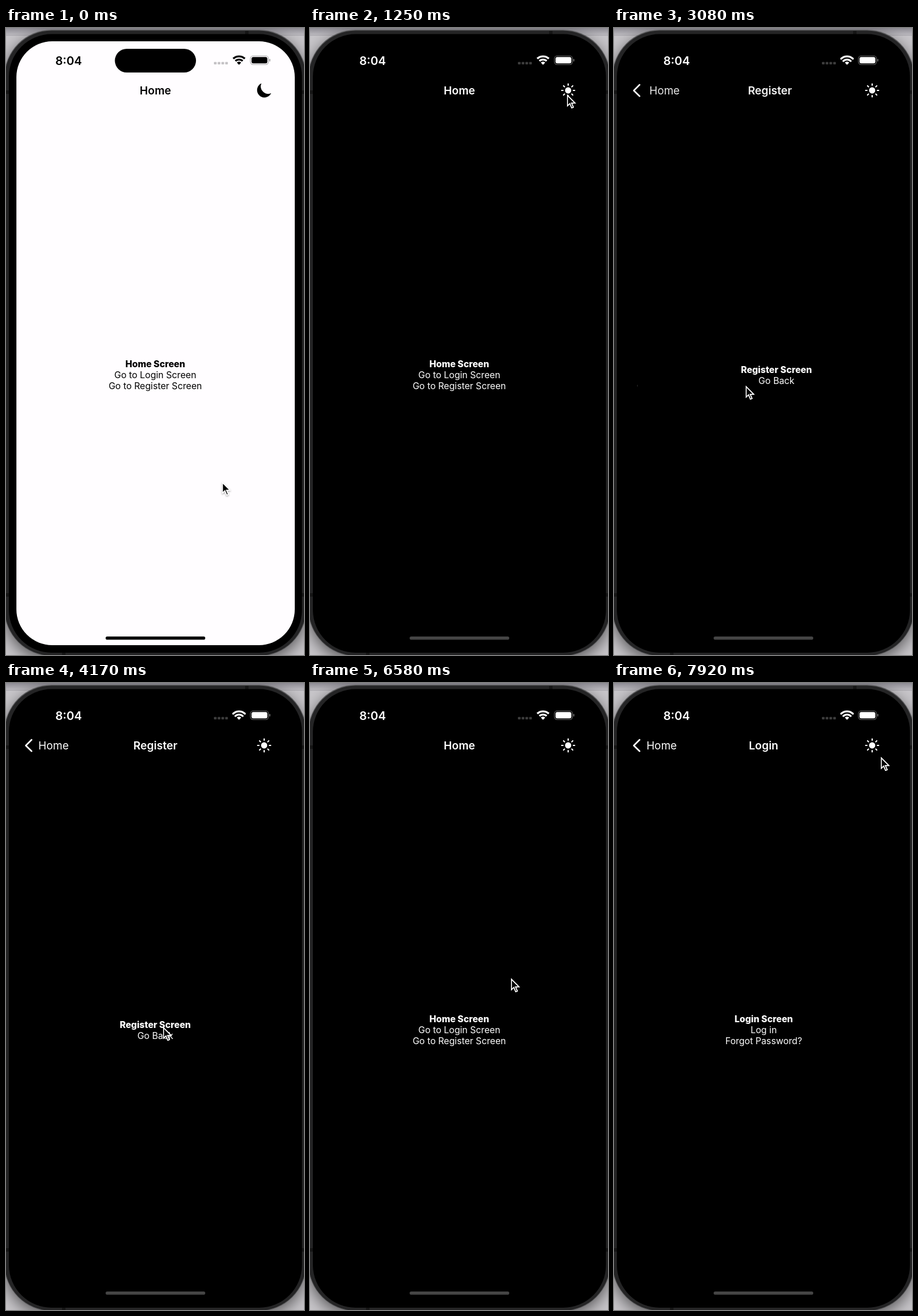
An HTML page with a canvas for the animation above (8000 ms loop, 516 px wide and 1085 px high).

```html
<!DOCTYPE html>
<html lang="en">
<head>
<meta charset="utf-8">
<title>Theme and navigation demo</title>
<style>
  html, body { margin: 0; width: 100%; height: 100%; overflow: hidden; background: #bebcc1; }
  canvas { display: block; }
</style>
</head>
<body>
<canvas id="stage" width="516" height="1085"></canvas>
<script>
const ctx = document.getElementById('stage').getContext('2d');
const W = 516, H = 1085, LOOP = 8000, FPS = 12;
const SCREEN = { x: 18, y: 23, w: 482, h: 1045, r: 62 };
const MID = 258.5;
const FAMILY = 'Inter, "Noto Sans", sans-serif';
const FONT = {
  clock: `600 20.2px ${FAMILY}`,
  title: `600 19.06px ${FAMILY}`,
  back: `400 18.8px ${FAMILY}`,
  bold: `800 15.7px ${FAMILY}`,
  body: `400 15.7px ${FAMILY}`
};

const PAGES = {
  home: { title: 'Home', top: 587, lines: ['Home Screen', 'Go to Login Screen', 'Go to Register Screen'] },
  register: { title: 'Register', top: 596.6, lines: ['Register Screen', 'Go Back'] },
  login: { title: 'Login', top: 587, lines: ['Login Screen', 'Log in', 'Forgot Password?'] }
};

// Moments in seconds
const PRESS = 1.16, DARK = 1.25, PUSH = 2.8, POP = 5.28, PUSH_LOGIN = 7.4;

// Pointer tip: [tick, x, y], 12 ticks per second
const POINTER = [
  [0, 374, 785], [1, 339, 756], [3, 339, 756], [13, 445, 115], [15, 445, 115],
  [23, 217, 631], [26, 219, 628], [28, 229, 615], [29, 229, 615], [32, 228, 619],
  [40, 228, 619], [42, 232, 636], [44, 266, 604], [45, 266, 604], [47, 253, 606],
  [50, 272, 595], [53, 272, 607], [54, 272, 607], [59, 269, 609], [62, 269, 610],
  [67, 269, 610], [70, 491, 45], [73, 280, 600], [77, 447, 80], [79, 348, 511],
  [83, 281, 600], [86, 279, 604], [89, 279, 604], [95, 462, 128], [96, 462, 128]
];
const ARROW = new Path2D('M.8 1.8V19.6L5 15.7 8.2 23.3 11 22.1 7.8 14.7H13.7Z');
const MOON = new Path2D('M-4.7-12.2A12.8 12.8 0 1 0 12.2 4.7A12.8 12.8 0 0 1-4.7-12.2Z');

const mix = (a, b, k) => a + (b - a) * k;
const smooth = k => k * k * (3 - 2 * k);
const spring = t => t <= 0 ? 0 : 1 - (1 + 17 * t) * Math.exp(-17 * t);

function box(x, y, w, h, r, color) {
  ctx.beginPath();
  ctx.roundRect(x, y, w, h, r);
  ctx.fillStyle = color;
  ctx.fill();
}

function text(str, x, y, font, color, align = 'center', alpha = 1) {
  if (alpha <= 0) return;
  ctx.globalAlpha = Math.min(1, alpha);
  ctx.font = font;
  ctx.fillStyle = color;
  ctx.textAlign = align;
  ctx.fillText(str, x, y);
  ctx.globalAlpha = 1;
}

function at(x, y, draw) {
  ctx.save();
  ctx.translate(x, y);
  draw();
  ctx.restore();
}

function backdrop() {
  const g = ctx.createLinearGradient(0, 0, 0, 14);
  g.addColorStop(0, '#8d8b93');
  g.addColorStop(1, '#c4c2c7');
  ctx.fillStyle = '#c8c6ca';
  ctx.fillRect(0, 0, W, H);
  ctx.fillStyle = g;
  ctx.fillRect(0, 0, W, 14);
  ctx.fillStyle = '#aaa8ad';
  ctx.fillRect(0, 12, W, 1);
}

function body() {
  ctx.save();
  ctx.shadowColor = 'rgba(0,0,0,.55)';
  ctx.shadowBlur = 26;
  ctx.shadowOffsetY = 8;
  box(-3, 3, 523, 1084, 82, '#5c5c5e');
  ctx.restore();
  box(-2, 4.5, 521, 1081.5, 81, '#242425');
  ctx.fillStyle = '#151515';
  for (const y of [108, 978]) {
    ctx.fillRect(0, y, 5, 6);
    ctx.fillRect(512, y, 4, 6);
  }
  ctx.fillRect(414, 5, 6, 6);
  ctx.fillRect(97, 1080, 6, 5);
  box(5, 10.5, 507.5, 1070.5, 74, '#000');
}

function statusBar(dark, ink) {
  text('8:04', 108.5, 63.6, FONT.clock, ink);
  for (let i = 0; i < 4; i++) box(360 + i * 6.5, 58.7, 4.7, 4.3, 1, dark ? '#3c3c3c' : '#c5c3c6');

  // Wi-Fi
  const span = 0.75, up = -Math.PI / 2;
  at(403.5, 63.8, () => {
    ctx.strokeStyle = ctx.fillStyle = ink;
    ctx.lineWidth = 3.4;
    for (const r of [14.7, 9.2]) {
      ctx.beginPath();
      ctx.arc(0, 0, r, up - span, up + span);
      ctx.stroke();
    }
    ctx.beginPath();
    ctx.moveTo(0, 0);
    ctx.arc(0, 0, 5.6, up - span, up + span);
    ctx.fill();
  });

  // Battery
  const edge = dark ? '#6a6a6a' : '#a5a4a6';
  ctx.beginPath();
  ctx.roundRect(423.2, 48.2, 31.3, 15, 4.6);
  ctx.strokeStyle = edge;
  ctx.lineWidth = 1.1;
  ctx.stroke();
  box(425.2, 50.2, 27.3, 11, 3, ink);
  box(455.8, 53.4, 1.8, 4.6, 1, edge);
}

function themeIcon(dark, ink) {
  at(447, 108, () => {
    ctx.fillStyle = ctx.strokeStyle = ink;
    if (!dark) return ctx.fill(MOON);
    ctx.lineWidth = 2.1;
    ctx.lineCap = 'round';
    ctx.beginPath();
    ctx.arc(0, 0, 5.4, 0, 7);
    ctx.fill();
    for (let i = 0; i < 8; i++) {
      ctx.beginPath();
      ctx.moveTo(8.9, 0);
      ctx.lineTo(11.3, 0);
      ctx.stroke();
      ctx.rotate(Math.PI / 4);
    }
  });
}

function content(page, dx, ink) {
  page.lines.forEach((line, i) =>
    text(line, MID + dx, page.top + i * 19.2, i ? FONT.body : FONT.bold, ink));
}

function header(page, p, ink) {
  text('Home', MID + 0.2 - 120 * p, 115, FONT.title, ink, 'center', 1 - 1.6 * p * p);
  if (p < 0.002) return;
  text(page.title, MID + 0.2 + 240 * (1 - p), 115, FONT.title, ink, 'center', p);
  text('Home', 56 + 110 * (1 - p), 115, FONT.back, ink, 'left', p * p);
  ctx.globalAlpha = p;
  ctx.beginPath();
  ctx.moveTo(44.3, 98.3);
  ctx.lineTo(34.3, 108.2);
  ctx.lineTo(44.3, 118);
  ctx.strokeStyle = ink;
  ctx.lineWidth = 2.7;
  ctx.lineCap = ctx.lineJoin = 'round';
  ctx.stroke();
  ctx.globalAlpha = 1;
}

function pointer(tick) {
  let i = 1;
  while (i < POINTER.length - 1 && POINTER[i][0] < tick) i++;
  const a = POINTER[i - 1], b = POINTER[i];
  const k = smooth((tick - a[0]) / (b[0] - a[0]));
  at(mix(a[1], b[1], k), mix(a[2], b[2], k), () => {
    ctx.lineJoin = 'miter';
    ctx.lineWidth = 1.6;
    ctx.strokeStyle = '#fff';
    ctx.fillStyle = '#000';
    ctx.save();
    ctx.shadowColor = 'rgba(0,0,0,.4)';
    ctx.shadowBlur = 3;
    ctx.shadowOffsetY = 1.5;
    ctx.stroke(ARROW);
    ctx.restore();
    ctx.fill(ARROW);
    ctx.stroke(ARROW);
  });
}

function openness(t) {
  if (t < POP) return spring(t - PUSH);
  if (t < PUSH_LOGIN) return 1 - spring(t - POP);
  return spring(t - PUSH_LOGIN);
}

function draw(tick) {
  const t = tick / FPS;
  const dark = t >= DARK;
  const ink = dark ? '#fff' : '#000', paper = dark ? '#000' : '#fffdff';
  const page = t < PUSH_LOGIN ? PAGES.register : PAGES.login;
  const p = openness(t);

  backdrop();
  body();
  ctx.save();
  box(SCREEN.x, SCREEN.y, SCREEN.w, SCREEN.h, SCREEN.r, paper);
  ctx.clip();
  content(PAGES.home, -0.3 * SCREEN.w * p, ink);
  if (p > 0.002) {
    const dx = SCREEN.w * (1 - p);
    ctx.fillStyle = paper;
    ctx.fillRect(SCREEN.x + dx, 130, SCREEN.w, 910);
    content(page, dx, ink);
  }
  header(page, p, ink);
  if (t >= PRESS && !dark) box(431, 92.5, 32, 31.5, 2, '#b4b2b5');
  themeIcon(dark, ink);
  statusBar(dark, ink);
  box(188.5, 36, 140.5, 41, 20.5, '#000');
  box(172.5, 1053, 172.5, 5.6, 2.8, dark ? '#454545' : '#000');
  ctx.restore();
  pointer(tick);
}

const start = performance.now();
function loop() {
  const ms = (performance.now() - start) % LOOP;
  draw(Math.min(95, Math.floor((ms + 4) * FPS / 1000)));
  requestAnimationFrame(loop);
}
loop();
</script>
</body>
</html>
```
